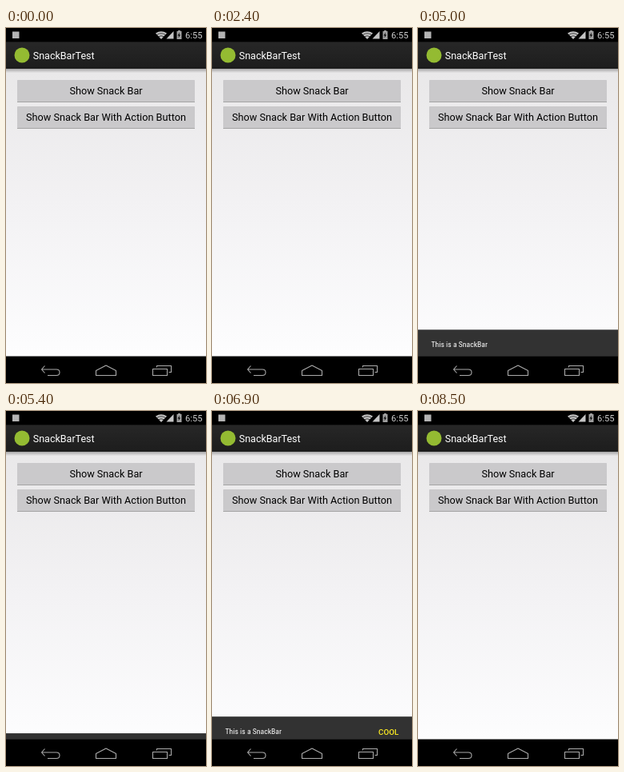
Write an HTML page that moves like this. It is 250 px wide and 444 px high and loops after 8.6 s.

```html
<!DOCTYPE html>
<html lang="en">
<head>
<meta charset="utf-8">
<title>Snack bar demo</title>
<style>
  html, body { margin: 0; width: 100%; height: 100%; overflow: hidden; background: #000; }
  svg { display: block; width: 100%; height: 100%; }
  text { font: 12.7px Roboto, "Noto Sans", sans-serif; }
  .title { font-size: 12.5px; fill: #fff; }
  .note { font: 9.7px "Roboto Condensed", Roboto, sans-serif; font-stretch: 75%; fill: #fff; }
  .action { font-size: 9.8px; font-weight: 500; fill: #fe2; }
  .clock { font-size: 11.2px; fill: #ccc; }
  .nav { fill: none; stroke: #aaa; stroke-width: 1.1; stroke-linejoin: round; }
</style>
</head>
<body>
<svg viewBox="0 0 250 444">
  <defs>
    <linearGradient id="page" x2="0" y2="1">
      <stop stop-color="#e9e8e9"/>
      <stop offset=".5" stop-color="#f3f2f4"/>
      <stop offset="1" stop-color="#fdfdfe"/>
    </linearGradient>
    <linearGradient id="bar" x2="0" y2="1">
      <stop stop-color="#272727"/>
      <stop offset="1" stop-color="#1d1d1d"/>
    </linearGradient>
    <linearGradient id="shade" x2="0" y2="1">
      <stop stop-opacity=".3"/>
      <stop offset="1" stop-opacity="0"/>
    </linearGradient>
    <g id="button">
      <rect x="14" width="222" height="27" rx=".7" fill="#cac9cb"/>
      <path d="M14 27.5H236" stroke="#a4a4a4"/>
    </g>
  </defs>

  <rect y="50" width="250" height="362" fill="url(#page)"/>
  <rect y="50.7" width="250" height="5.500" fill="url(#shade)"/>
  <use href="#button" y="65"/>
  <use href="#button" y="98"/>
  <g text-anchor="middle">
    <text x="125" y="83.3">Show Snack Bar</text>
    <text x="125" y="116.3">Show Snack Bar With Action Button</text>
  </g>

  <g id="snack">
    <rect width="250" height="34" fill="#323232"/>
    <text class="note" x="16.5" y="21.5">This is a SnackBar</text>
    <text class="action" id="action" x="208" y="22.5">COOL</text>
  </g>

  <rect width="250" height="17.5" fill="#000"/>
  <rect y="17.4" width="250" height="33.3" fill="url(#bar)"/>
  <path d="M0 50.2H250" stroke="#111"/>
  <circle cx="20" cy="34" r="9.5" fill="#94bb32"/>
  <text class="title" x="33.8" y="38.7">SnackBarTest</text>

  <rect x="8" y="4.5" width="8.5" height="8.5" fill="#b4b4b4"/>
  <g fill="#c4c4c4">
    <path d="M187 6.500Q194 2 201 6.500L194 14Z"/>
    <path d="M209.500 4V13.500H200.500Z"/>
    <path d="M215 3h3v1h1.500v10h-6V4H215Z" fill="#a0a0a0"/>
  </g>
  <path d="M188.500 8.500Q194 5 199.500 8.500M190.500 10.800Q194 8.800 197.500 10.800" fill="none" stroke="#000" stroke-width=".7"/>
  <path d="M217 5.500L214.500 9.500H216L215.500 12.500L218 8.500H216.500Z" fill="#000"/>
  <text class="clock" x="224" y="13">6:55</text>

  <rect y="410.7" width="250" height="34" fill="#000"/>
  <g class="nav">
    <path d="M48.500 422.500L44.500 427L48.500 431.500M44.500 427H63Q67 427 67 430.700T63 434.500H52"/>
    <path d="M112.500 428.500L125 422L137.500 428.500V434.500H112.500Z"/>
    <path d="M183.500 426.500H201.500V434.500H183.500ZM188.500 424.500V422.500H206.500V430.500H203.500"/>
  </g>
</svg>
<script>
const LOOP = 8600, STEP = 100, SLIDE = 600, BOTTOM = 410.7, HEIGHT = 33.4;
const get = id => document.getElementById(id);

// Accelerate-decelerate easing of one slide
function slide(t, start) {
  const p = Math.min(1, Math.max(0, (t - start) / SLIDE));
  return (1 - Math.cos(Math.PI * p)) / 2;
}

function draw(now) {
  const t = Math.floor((now % LOOP) / STEP) * STEP;
  const second = t >= 6000;
  const shown = second
    ? slide(t, 6450) - slide(t, 7900)
    : slide(t, 2450) - slide(t, 4990);
  get("snack").setAttribute("transform", `translate(0 ${BOTTOM - HEIGHT * shown})`);
  get("action").style.display = second ? "" : "none";
}

const began = performance.now();
function tick() {
  draw(performance.now() - began);
  requestAnimationFrame(tick);
}
tick();
</script>
</body>
</html>
```
